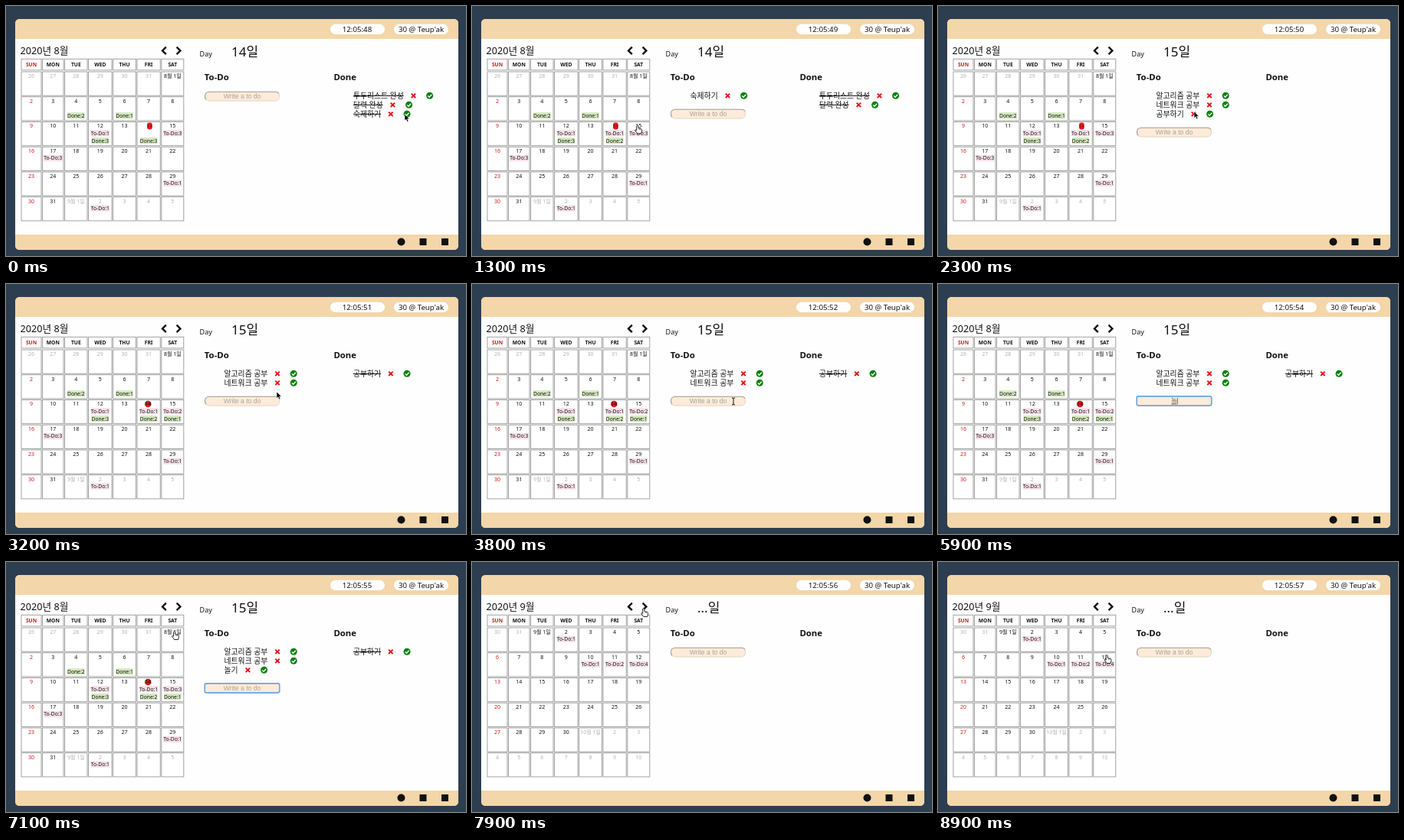
Write an HTML page that moves like this. It is 600x327 px and loops after 9 s.

```html
<!DOCTYPE html>
<html lang="ko">
<head>
<meta charset="utf-8">
<title>To-Do calendar</title>
<style>
  html, body { margin: 0; width: 100%; height: 100%; overflow: hidden; background: #2c3e50; }
  svg { display: block; width: 600px; height: 327px; }
  text { font-family: "Noto Sans", "Noto Sans CJK KR", sans-serif; white-space: pre; }
  .field { font-family: "Liberation Sans", "Noto Sans CJK KR", sans-serif; }
</style>
</head>
<body>
<svg id="stage" viewBox="0 0 600 327"></svg>
<script>
const LOOP = 9000;
const stage = document.getElementById('stage');
const ruler = document.createElement('canvas').getContext('2d');

const INK = '#111', SAND = '#f3d6a9', GRAY = '#b3b3b3';
const LEFT = [20, 47.6, 76.6, 107.6, 139.6, 171, 202.8, 233.4];
const WEEKDAYS = ['SUN', 'MON', 'TUE', 'WED', 'THU', 'FRI', 'SAT'];

// Moments of the user's actions
const REOPEN = 300, PICK_DAY = 1500, FINISH = 3200, FOCUS = 4200, ENTER = 6700, NEXT_MONTH = 7600;
const TYPING = [[5500, 'ㄴ'], [5700, '노'], [5900, '놀'], [6200, '놀ㄱ'], [6400, '놀기'], [ENTER, '']];
const POINTER = [
  [0, 520, 141.5], [400, 520, 141.5], [1200, 215.8, 155.8], [1600, 215.8, 155.8],
  [2300, 334, 138], [2700, 353, 141], [3200, 353, 141], [3700, 341, 153.5],
  [6700, 341, 153.5], [7100, 219.6, 90.5], [7400, 224, 57], [7800, 224, 57],
  [8500, 220.2, 121.5], [LOOP, 220.2, 121.5]
];

const label = (x, y, size, str, attrs = '') =>
  `<text x="${x}" y="${y}" font-size="${size}" fill="${INK}" ${attrs}>${str}</text>`;
const centered = (x, y, size, str, attrs = '') =>
  label(x, y, size, str, `text-anchor="middle" ${attrs}`);
const box = (x, y, w, h, fill, attrs = '') =>
  `<rect x="${x}" y="${y}" width="${w}" height="${h}" fill="${fill}" ${attrs}/>`;
const line = (d, color, width, attrs = '') =>
  `<path d="${d}" fill="none" stroke="${color}" stroke-width="${width}" ${attrs}/>`;

function stateAt(t) {
  const typed = TYPING.filter(([at]) => t >= at).pop();
  const reopened = t >= REOPEN, finished = t >= FINISH, added = t >= ENTER;
  const state = {
    clock: '12:05:' + (48 + Math.floor((t + 450) / 1000)),
    month: t < NEXT_MONTH ? 8 : 9,
    day: t < PICK_DAY ? '14' : t < NEXT_MONTH ? '15' : '...',
    focus: t >= FOCUS && t < NEXT_MONTH,
    typed: typed ? typed[1] : '',
    roundMark: finished,
    todo: [], done: [],
    counts: {
      '8/4': [0, 2], '8/6': [0, 1], '8/12': [1, 3],
      '8/14': reopened ? [1, 2] : [0, 3],
      '8/15': [3 - finished + added, +finished],
      '8/17': [3, 0], '8/29': [1, 0],
      '9/2': [1, 0], '9/10': [1, 0], '9/11': [2, 0], '9/12': [4, 0]
    }
  };
  if (state.day === '14') {
    state.done = ['투두리스트 완성', '달력 완성'];
    (reopened ? state.todo : state.done).push('숙제하기');
  } else if (state.day === '15') {
    state.todo = ['알고리즘 공부', '네트워크 공부'];
    (finished ? state.done : state.todo).push('공부하기');
    if (added) state.todo.push('놀기');
  }
  return state;
}

function frame(clock) {
  return box(12, 17, 578, 302, '#fefefe', 'rx="6"') +
    `<path d="M12 43V23q0-6 6-6H584q6 0 6 6V43Z M12 299V313q0 6 6 6H584q6 0 6-6V299Z" fill="${SAND}"/>` +
    box(423, 23.7, 71, 13.3, '#fff', 'rx="6.6"') +
    box(506, 23.7, 71, 13.3, '#fff', 'rx="6.6"') +
    centered(458, 33.8, 9.7, clock) +
    centered(541.5, 33.8, 9.7, "30 @ Teup'ak") +
    `<circle cx="515.5" cy="308.5" r="5" fill="${INK}"/>` +
    box(539.5, 304, 9, 9, INK) + box(568, 304, 9, 9, INK);
}

function badge(x, y, str, fill) {
  return box(x - 12.2, y - 4.2, 24.4, 8.4, fill) + centered(x, y + 2.4, 6.7, str);
}

function dayCell(index, { month, counts, roundMark }) {
  const col = index % 7, row = Math.floor(index / 7);
  const date = new Date(2020, month - 1, 1 - new Date(2020, month - 1, 1).getDay() + index);
  const m = date.getMonth() + 1, d = date.getDate();
  const left = LEFT[col], width = LEFT[col + 1] - left - 1.6;
  const x = left + width / 2, top = 86 + row * 32.75;
  const color = m !== month ? GRAY : col ? INK : '#d8161c';
  const [todo, done] = counts[m + '/' + d] || [0, 0];
  let out = box(left, top, width, 31.2, '#fff', 'stroke="#999" stroke-width=".9"');
  if (m === 8 && d === 14 && month === 8) {
    out += roundMark
      ? `<circle cx="185.2" cy="${top + 5.5}" r="4.3" fill="#e5141b"/>` + centered(185.2, top + 7.9, 7, d)
      : box(184, top + 1, 6.8, 9, '#e5141b', 'rx="3.2"') +
        centered(187.2, top + 7.6, 5.5, d, 'style="fill:#8d0a10"');
  } else {
    out += centered(x, top + 7.8, 7, d === 1 ? `${m}월 1일` : d, `style="fill:${color}"`);
  }
  if (todo) out += badge(x, top + 14.8, 'To-Do:' + todo, '#f8e0e8');
  if (done) {
    out += box(x - 11.2, top + 20.4, 22.4, 8.4, '#d5e8bf') + centered(x, top + 27, 6.7, 'Done:' + done);
  }
  return out;
}

function calendar(state) {
  let out = label(18.6, 62.6, 12.7, `2020년 ${state.month}월`) +
    line('M208.8 53.6L204 58.4L208.8 63.2M222.6 53.6L227.4 58.4L222.6 63.2', INK, 2.4);
  WEEKDAYS.forEach((name, col) => {
    const width = LEFT[col + 1] - LEFT[col] - 1.6;
    out += box(LEFT[col], 69.3, width, 14.6, '#fff', 'stroke="#999" stroke-width=".9"') +
      centered(LEFT[col] + width / 2, 78.6, 6.7, name,
        `font-weight="700" style="fill:${col ? INK : '#d8161c'}"`);
  });
  for (let i = 0; i < 42; i++) out += dayCell(i, state);
  return out;
}

function list(items, x, struck) {
  const size = 9.8;
  ruler.font = `${size}px "Noto Sans", "Noto Sans CJK KR", sans-serif`;
  return items.map((item, i) => {
    const y = 117.3 + i * 12, end = x + ruler.measureText(item).width;
    const cross = end + 12.8, check = end + 34;
    return label(x, y + 3.5, size, item, struck ? 'text-decoration="line-through"' : '') +
      line(`M${cross - 2.7} ${y - 2.7}l5.4 5.4m0-5.4l-5.4 5.4`, '#e60f14', 1.9) +
      `<circle cx="${check}" cy="${y}" r="4.5" fill="#0b800f"/>` +
      line(`M${check - 2.4} ${y + .1}l1.8 1.8l3.2-3.4`, '#fff', 1.3);
  }).join('');
}

const fieldY = count => count ? 129 + 12 * count : 118;

function field({ todo, focus, typed }) {
  const y = fieldY(todo.length), top = y - 6.3;
  let out = box(259, top, 98, 12.8, '#fdebd9', `rx="${focus ? 3 : 6.2}"`);
  out += focus
    ? box(259.2, top + .2, 97.6, 12.2, 'none', 'rx="2.5" stroke="#6aa5e3" stroke-width="1.6"')
    : line(`M261 ${top + 10.8}Q259.5 ${top + 9} 259.5 ${top + 6.5}Q259.5 ${top + .5} 265.5 ${top + .5}` +
        `H351Q355 ${top + .5} 356 ${top + 3}`, '#a39a92', 1.1) +
      line(`M261 ${top + 10.8}Q263 ${top + 12.4} 265.5 ${top + 12.4}H351Q356.6 ${top + 12.4} 356.6 ${top + 6.4}` +
        `Q356.6 ${top + 4.5} 356 ${top + 3}`, '#e3d5c6', .9);
  if (!typed) return out + centered(308, y + 3, 8.6, 'Write a to do', 'class="field" style="fill:#a9a39d"');
  ruler.font = '8.6px "Liberation Sans", "Noto Sans CJK KR", sans-serif';
  const half = ruler.measureText(typed).width / 2;
  return out + centered(308, y + 3, 8.6, typed, 'class="field" style="fill:#666"') +
    line(`M${308 - half} ${y + 4.4}h${half * 2}`, '#777', .6) +
    line(`M${308.4 + half} ${y - 4}v8`, '#333', .7);
}

function details(state) {
  return label(252.6, 66.2, 9, 'Day') + label(294, 66.2, 17, state.day + '일') +
    label(258.8, 97.4, 11.4, 'To-Do', 'font-weight="700"') +
    label(427.4, 97.4, 11.4, 'Done', 'font-weight="700"') +
    list(state.todo, 284.6, false) + list(state.done, 453, true) + field(state);
}

function pointerAt(t) {
  const next = POINTER.findIndex(([at]) => at > t);
  const [t0, x0, y0] = POINTER[next - 1], [t1, x1, y1] = POINTER[next];
  const p = (t - t0) / (t1 - t0), eased = p * p * (3 - 2 * p);
  return [x0 + (x1 - x0) * eased, y0 + (y1 - y0) * eased];
}

function pointer(t, count) {
  if (t >= TYPING[0][0] && t < ENTER) return '';
  const [x, y] = pointerAt(t);
  let shape;
  if (x < 233) {
    shape = '<path d="M-1.1 1Q0-.9 1.1 1V4L4.8 4.9Q6 5.3 5.8 7L5 11H0L-2.9 7.2Q-3.3 5.8-2.1 6L-1.1 6.8Z" ' +
      'fill="#fff" stroke="#111" stroke-width=".9"/>' + line('M2.3 4.6V6.4M3.8 5V6.6', INK, .5);
  } else if (x > 259 && x < 357 && Math.abs(y - fieldY(count)) < 6.5) {
    shape = line('M-2-4.6Q0-4.6 0-3.4Q0-4.6 2-4.6M0-3.6V3.6M-2 4.6Q0 4.6 0 3.4Q0 4.6 2 4.6', INK, 1);
  } else {
    shape = '<path d="M0 0V8.6L2 6.8L3.4 10L5 9.3L3.6 6.2H6.3Z" fill="#000" stroke="#fff" stroke-width=".6"/>';
  }
  return `<g transform="translate(${x} ${y})">${shape}</g>`;
}

let shown = -1;
function draw(now) {
  const t = Math.floor((now % LOOP) / 100) * 100;
  if (t !== shown) {
    shown = t;
    const state = stateAt(t);
    stage.innerHTML = frame(state.clock) + calendar(state) + details(state) + pointer(t, state.todo.length);
  }
}

const start = performance.now();
function tick() {
  draw(performance.now() - start);
  requestAnimationFrame(tick);
}
tick();
</script>
</body>
</html>
```
